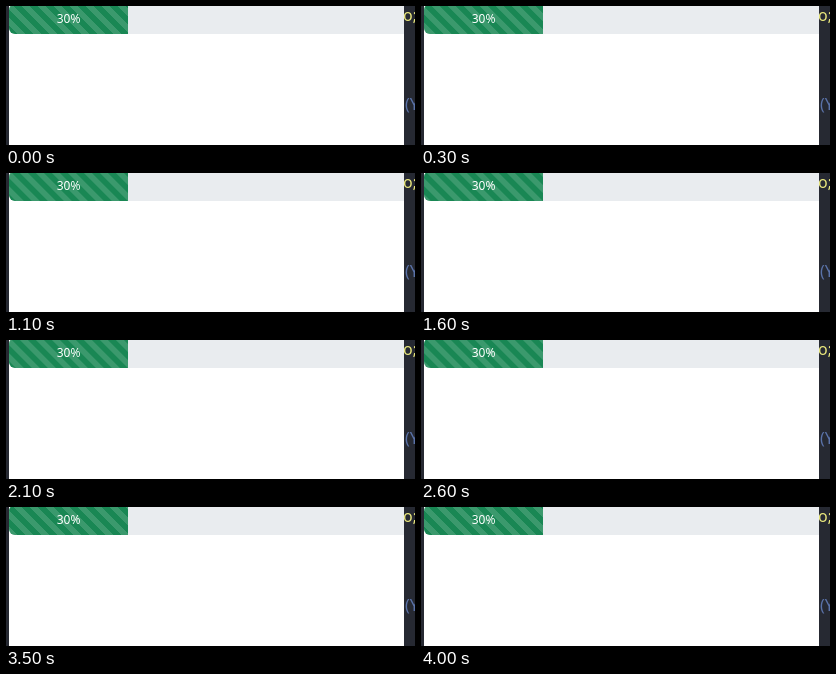
An HTML page that plays this animation: 409x139 px, repeating every 4100 ms.

```html
<!DOCTYPE html>
<html lang="en">
<head>
<meta charset="utf-8">
<title>Striped progress bar</title>
<style>
  html, body { margin: 0; width: 100%; height: 100%; overflow: hidden; background: #262932; }
  .stage { position: relative; width: 409px; height: 139px; overflow: hidden; font-family: "Noto Sans", sans-serif; }
  .page { position: absolute; left: 3px; top: 0; width: 395px; height: 139px; background: #fff; overflow: hidden; }
  .progress { position: absolute; left: 0; top: -2px; width: 397px; height: 30px; border-radius: 6px 0 0 6px; overflow: hidden; background: #e9ecef; }
  .bar {
    display: flex; align-items: center; justify-content: center;
    width: 30%; height: 100%;
    color: #fff; font-size: 12px; font-weight: 500; line-height: 18px;
    background: #198754 linear-gradient(45deg,
      rgba(255,255,255,.15) 25%, transparent 25%, transparent 50%,
      rgba(255,255,255,.15) 50%, rgba(255,255,255,.15) 75%, transparent 75%) 0 0 / 16px 16px;
  }
  .code { position: absolute; font-size: 16px; line-height: 22px; white-space: pre; }
  .yellow { left: 397px; top: -2px; color: #e8e67c; font-weight: 500; }
  .comment { left: 399px; top: 87px; color: #5a72a8; }
</style>
</head>
<body>
<div class="stage">
  <span class="code yellow">o;</span>
  <span class="code comment">(Y</span>
  <div class="page">
    <div class="progress"><div class="bar">30%</div></div>
  </div>
</div>
<script>
  const LOOP = 4100, STEP = 100, TILE = 16, CYCLE = 1000, START = 10;
  const travel = TILE * LOOP / CYCLE;
  document.querySelector('.bar').animate(
    { backgroundPositionX: [`${START}px`, `${START - travel}px`] },
    { duration: LOOP, easing: `steps(${LOOP / STEP})`, iterations: Infinity }
  );
</script>
</body>
</html>
```
